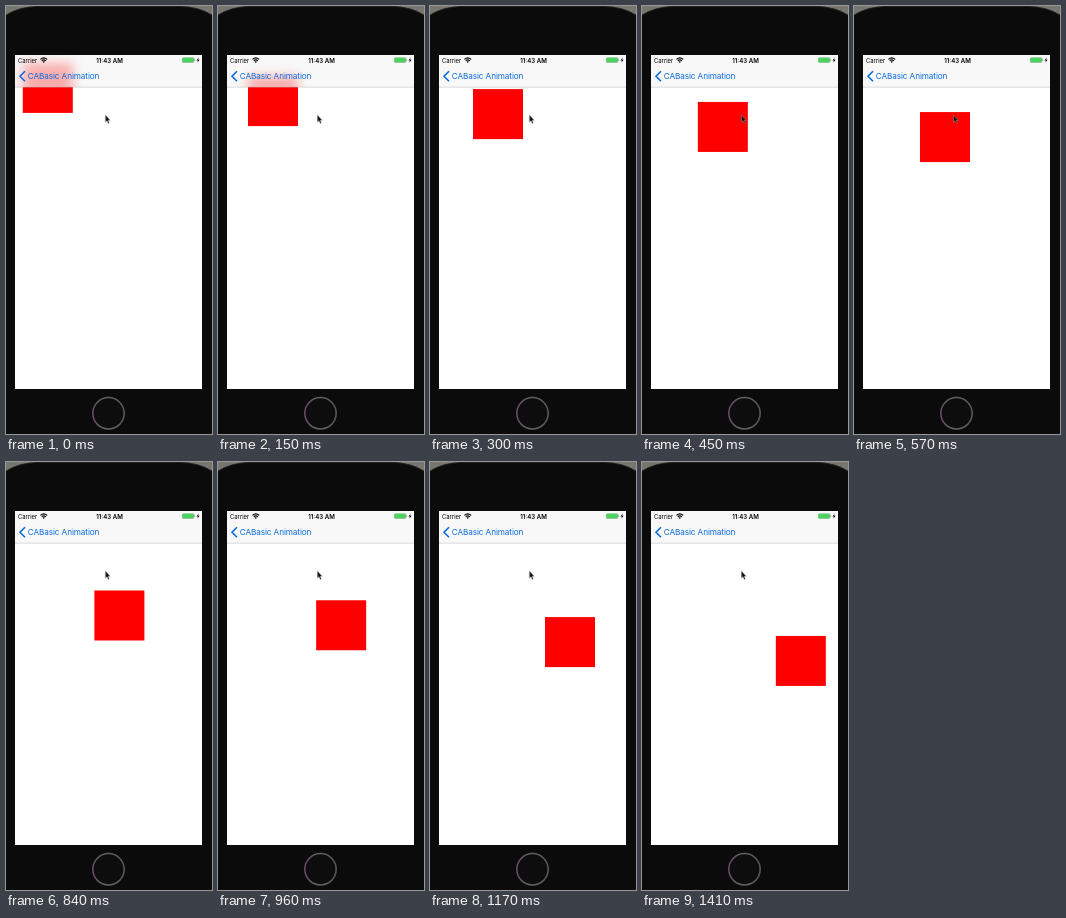
These frames come from a looping animation (206x428 px, 1.65 s). An HTML page:

```html
<!DOCTYPE html>
<html lang="en">
<head>
<meta charset="utf-8">
<title>Layer animation</title>
<style>
  html, body { margin: 0; width: 100%; height: 100%; overflow: hidden; background: #0b0b0b; }
  svg { display: block; width: 206px; height: 428px; }
  text { font-family: Inter, Roboto, sans-serif; }
</style>
</head>
<body>
<svg viewBox="0 0 206 428">
  <defs>
    <clipPath id="screen"><rect x="9" y="49" width="187" height="334"/></clipPath>
    <clipPath id="bar"><rect x="9" y="49" width="187" height="32"/></clipPath>
    <filter id="blur" filterUnits="userSpaceOnUse" x="-20" y="20" width="240" height="130">
      <feGaussianBlur stdDeviation="6"/>
    </filter>
    <linearGradient id="ring">
      <stop stop-color="#6b4a6c"/>
      <stop offset=".3" stop-color="#626262"/>
      <stop offset="1" stop-color="#5c5c5c"/>
    </linearGradient>
  </defs>

  <!-- phone body -->
  <rect width="206" height="428" fill="#0b0b0b"/>
  <path d="M0 0H32Q12 1 0 9ZM206 0H174Q194 1 206 9Z" fill="#77776f"/>
  <path d="M0 9Q12 1 32 .4H174Q194 1 206 9" fill="none" stroke="#292929" stroke-width=".8"/>
  <circle cx="102.5" cy="407.3" r="15.7" fill="#0d0d0d" stroke="url(#ring)" stroke-width="1.5"/>

  <!-- screen -->
  <g clip-path="url(#screen)">
    <rect x="9" y="49" width="187" height="334" fill="#fff"/>
    <rect id="box" width="50" height="50" fill="#f00"/>
    <rect x="9" y="49" width="187" height="32" fill="#f8f8f8"/>
    <g clip-path="url(#bar)">
      <rect id="glow" width="50" fill="#f00" opacity=".3" filter="url(#blur)"/>
    </g>
    <path d="M9 81.2H196" stroke="#b4b4b4" stroke-width=".5"/>
  </g>

  <!-- status bar -->
  <text x="12" y="56.5" font-size="5.9">Carrier</text>
  <g fill="none" stroke="#000" stroke-width="1.1">
    <path d="M34.4 53.4Q37.8 50.2 41.2 53.4M35.7 54.8Q37.8 52.8 39.9 54.8"/>
  </g>
  <path d="M36.6 55.8Q37.8 54.8 39 55.8L37.8 57Z"/>
  <text x="103.5" y="56.5" font-size="6.1" font-weight="600" text-anchor="middle">11:43 AM</text>
  <rect x="176.3" y="51.7" width="11.6" height="4.8" rx="1" fill="#4cd35f" stroke="#78a87e" stroke-width=".5"/>
  <path d="M188.7 53.2V55" stroke="#888" stroke-width=".7"/>
  <path d="M192.6 51.6L190.6 54.5H192L191.4 56.8L193.6 53.7H192.2Z"/>

  <!-- navigation bar -->
  <path d="M19 65.2L14 70.2L19 75.2" fill="none" stroke="#0a6be0" stroke-width="1.6"/>
  <text x="21.7" y="73.1" font-size="8.2" letter-spacing="-.1" fill="#0a6be0">CABasic Animation</text>

  <!-- pointer -->
  <path d="M99.4 109V116L101 114.7L102.2 117.4L103.3 116.9L102.2 114.3H104.2Z"
        fill="#151515" stroke="#aaa" stroke-width=".4"/>
</svg>
<script>
  const LOOP = 1650, STEP = 30, END = 1410, BAR_BOTTOM = 81;
  const box = document.getElementById('box');
  const glow = document.getElementById('glow');

  function render(now) {
    const t = Math.min(Math.floor(now % LOOP / STEP) * STEP, END);
    const x = 16.8 + 0.0885 * t - 3.9e-6 * t * t; // slightly slowing diagonal
    const y = x + 40.1;
    for (const el of [box, glow]) {
      el.setAttribute('x', x);
      el.setAttribute('y', y);
    }
    // mirrored at the bar's lower edge so the blur stays strong there
    glow.setAttribute('height', Math.max(0, 2 * (BAR_BOTTOM - y)));
    requestAnimationFrame(render);
  }
  render(0);
</script>
</body>
</html>
```
